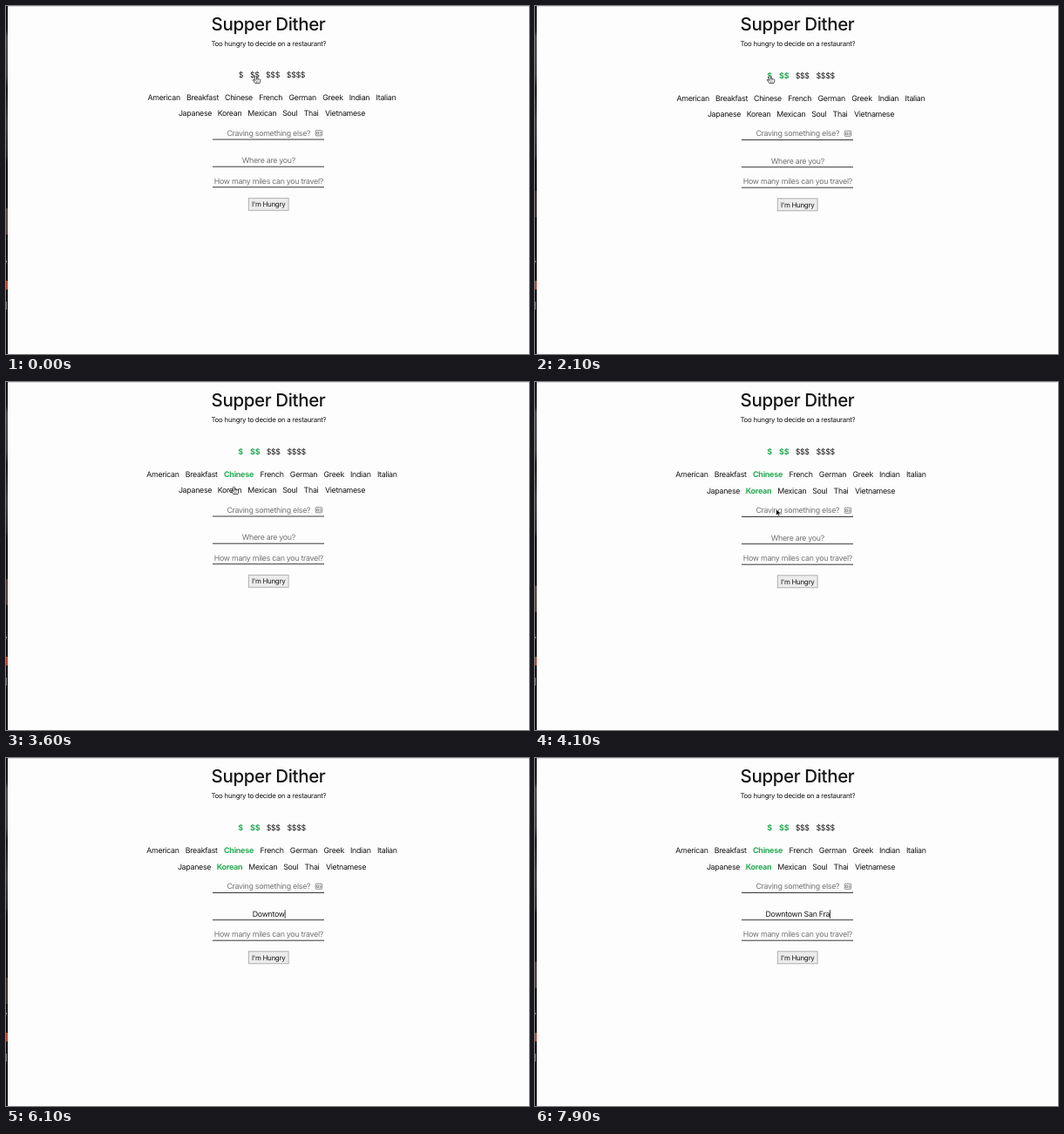
These frames come from a looping animation (600 px wide and 399 px high, 8 s). An HTML page:

```html
<!DOCTYPE html>
<html lang="en">
<head>
<meta charset="utf-8">
<title>Supper Dither</title>
<style>
html, body { margin: 0; width: 100%; height: 100%; overflow: hidden; background: #fdfdfd; }
svg { display: block; width: 600px; height: 399px; }
text {
  font: 400 8.8px Inter, "Liberation Sans", sans-serif;
  letter-spacing: -.28px;
  text-anchor: middle;
  text-rendering: geometricPrecision;
  white-space: pre;
  fill: #151515;
}
.title { font-size: 20.5px; font-weight: 500; letter-spacing: -.37px; }
.small { font-size: 7.9px; letter-spacing: -.27px; }
.hint { fill: #717171; }
.on { font-size: 9px; font-weight: 700; fill: #2bab56; }
.line { fill: #3a3a3a; }
</style>
</head>
<body>
<svg id="stage" viewBox="0 0 600 399">
  <defs>
    <linearGradient id="edge" x1="0" y1="0" x2="0" y2="1">
      <stop offset="0" stop-color="#121214"/>
      <stop offset=".07" stop-color="#1b1b1e"/>
      <stop offset=".09" stop-color="#48484c"/>
      <stop offset=".2" stop-color="#3d3d42"/>
      <stop offset=".24" stop-color="#17171a"/>
      <stop offset=".34" stop-color="#3a3b42"/>
      <stop offset=".43" stop-color="#26262b"/>
      <stop offset=".45" stop-color="#0c0c0e"/>
      <stop offset="1" stop-color="#0c0c0e"/>
    </linearGradient>
  </defs>
  <rect width="600" height="399" fill="#fdfdfd"/>
  <rect width="600" height="1" fill="#dedede"/>
  <rect width="2" height="399" fill="url(#edge)"/>
  <rect id="glow" width="2" height="30" fill="#5c4640"/>
  <rect y="292" width="1" height="2" fill="#8b8b8b"/>
  <rect y="315" width="2" height="10" fill="#b8402c"/>
  <rect y="339" width="1" height="9" fill="#777"/>
  <text class="title" x="301" y="27.8">Supper Dither</text>
  <text class="small" x="301.4" y="45.6">Too hungry to decide on a restaurant?</text>
  <g id="menu"></g>
  <g id="form">
    <text class="hint" x="301.3" y="148.8">Craving something else?</text>
    <g fill="none" stroke="#777" stroke-width=".8">
      <rect x="355.2" y="142.6" width="7.4" height="6.2" rx=".8"/>
      <path d="M356.6 144.6h2v2.4h-2zM359.8 144.6h1.8M359.8 145.9h1.8M359.8 147.2h1.8"/>
    </g>
    <rect class="line" x="237" y="152.5" width="128" height="1"/>
    <text id="place" x="301.3" y="180"></text>
    <rect id="caret" y="172.6" width=".8" height="10" fill="#222"/>
    <rect class="line" x="237" y="183.7" width="128" height="1"/>
    <text class="hint" x="301.4" y="203.7">How many miles can you travel?</text>
    <rect class="line" x="237" y="207.2" width="128" height="1"/>
    <rect x="278.3" y="220.3" width="45.8" height="14" fill="#ececec" stroke="#a9a9a9" stroke-width=".9"/>
    <text class="small" x="301.2" y="230.3">I'm Hungry</text>
  </g>
  <g id="hand" stroke="#222" stroke-width=".8" fill="#fff" stroke-linejoin="round" stroke-linecap="round">
    <path d="M-1 .7Q0-.6 1 .7V3.4Q2.2 2.8 2.7 3.7Q3.8 3.2 4.2 4.2Q5.3 4 5.3 5.2Q5.3 7.2 4.4 8.7H-.6Q-1.6 7-3.2 5.2Q-3.5 4.2-2.4 4.4L-1 5.4Z"/>
    <path d="M1 3.4V4.6M2.7 3.8V4.8M1 6V7.5M2.6 6V7.5" stroke-width=".5"/>
  </g>
  <path id="arrow" d="M0 0V7.4L1.7 5.9L2.8 8.4L4.1 7.8L3 5.4H5.3Z" fill="#000" stroke="#fff" stroke-width=".6"/>
  <path id="beam" d="M-1.5-4.5Q0-4.5 0-3.5V3.5Q0 4.5-1.5 4.5M1.5-4.5Q0-4.5 0-3.5M0 3.5Q0 4.5 1.5 4.5" fill="none" stroke="#222" stroke-width=".7"/>
</svg>
<script>
const LOOP = 8000, STEP = 100, DROP = .5;
const $ = id => document.getElementById(id);

// picks: [word index, time it turns green]
const rows = [
  { y: 82.3, spread: .35, picks: [[1, 500], [0, 2000]],
    words: [["$", 269.5], ["$$", 285.3], ["$$$", 306], ["$$$$", 332.5]] },
  { y: 108.2, spread: 1.3, picks: [[2, 3000]],
    words: [["American", 181.2], ["Breakfast", 225.5], ["Chinese", 267], ["French", 303.8],
            ["German", 340.2], ["Greek", 375], ["Indian", 405.5], ["Italian", 436]] },
  { y: 126.2, spread: 1, picks: [[1, 3800]],
    words: [["Japanese", 217], ["Korean", 256.5], ["Mexican", 293.8],
            ["Soul", 325.8], ["Thai", 350], ["Vietnamese", 389]] }
];

// time, x, y, pointer shape from then on
const track = [
  [0, 286.5, 80, "hand"], [1000, 286.5, 80, "hand"], [1200, 276, 79.5, "arrow"],
  [1300, 272, 79, "arrow"], [1500, 269.5, 79.5, "hand"], [2200, 269.5, 80, "hand"],
  [2300, 269, 86, "arrow"], [2500, 268, 100, "hand"], [2800, 267.5, 101, "hand"],
  [3100, 267, 102, "hand"], [3200, 265, 110, "arrow"], [3400, 261.5, 120, "hand"],
  [3900, 261.5, 120, "hand"], [4000, 266, 130, "arrow"], [4300, 298, 177, "beam"],
  [4800, 298, 177, "none"]
];

const address = "Downtown San Fra";
const keys = [4800, 5200, 5500, 5700, 5800, 5900, 6100, 6300,
              6500, 6900, 7100, 7200, 7400, 7600, 7700, 7900];
const FOCUS = 4400;

for (const row of rows) {
  row.nodes = row.words.map(([word]) => {
    const node = document.createElementNS("http://www.w3.org/2000/svg", "text");
    node.textContent = word;
    $("menu").append(node);
    return node;
  });
}

function drawMenu(t) {
  let drop = 0;
  for (const row of rows) {
    const on = row.picks.filter(p => t >= p[1]).map(p => p[0]);
    if (on.length) drop += DROP;
    row.nodes.forEach((node, i) => {
      const shift = on.reduce((sum, k) => sum + Math.sign(i - k) * row.spread, 0);
      node.setAttribute("x", row.words[i][1] + shift);
      node.setAttribute("y", row.y + drop);
      node.setAttribute("class", on.includes(i) ? "on" : "");
    });
  }
  $("form").setAttribute("transform", `translate(0 ${drop})`);
}

function drawField(t) {
  const typed = address.slice(0, keys.filter(k => t >= k).length);
  const place = $("place");
  place.textContent = typed || "Where are you?";
  place.setAttribute("class", typed ? "" : "hint");
  const half = typed ? place.getComputedTextLength() / 2 : 0;
  $("caret").setAttribute("x", 301.2 + half);
  $("caret").setAttribute("visibility", t >= FOCUS ? "visible" : "hidden");
}

function drawPointer(t) {
  const i = track.findLastIndex(p => t >= p[0]);
  const [t0, x0, y0, shape] = track[i];
  const [t1, x1, y1] = track[i + 1] || [LOOP, x0, y0];
  const k = (t - t0) / (t1 - t0);
  for (const id of ["hand", "arrow", "beam"]) {
    $(id).setAttribute("visibility", id === shape ? "visible" : "hidden");
    $(id).setAttribute("transform", `translate(${x0 + (x1 - x0) * k} ${y0 + (y1 - y0) * k})`);
  }
}

function drawEdge(t) {
  const wave = Math.sin(t / LOOP * Math.PI * 2);
  $("glow").setAttribute("y", 232 - 20 * wave);
  $("glow").setAttribute("opacity", .75 + .2 * Math.cos(t / 700));
}

const start = performance.now();
function frame() {
  const now = (performance.now() - start) % LOOP;
  const t = Math.floor(now / STEP) * STEP;
  drawMenu(t);
  drawField(t);
  drawPointer(t);
  drawEdge(t);
  requestAnimationFrame(frame);
}
frame();
</script>
</body>
</html>
```
